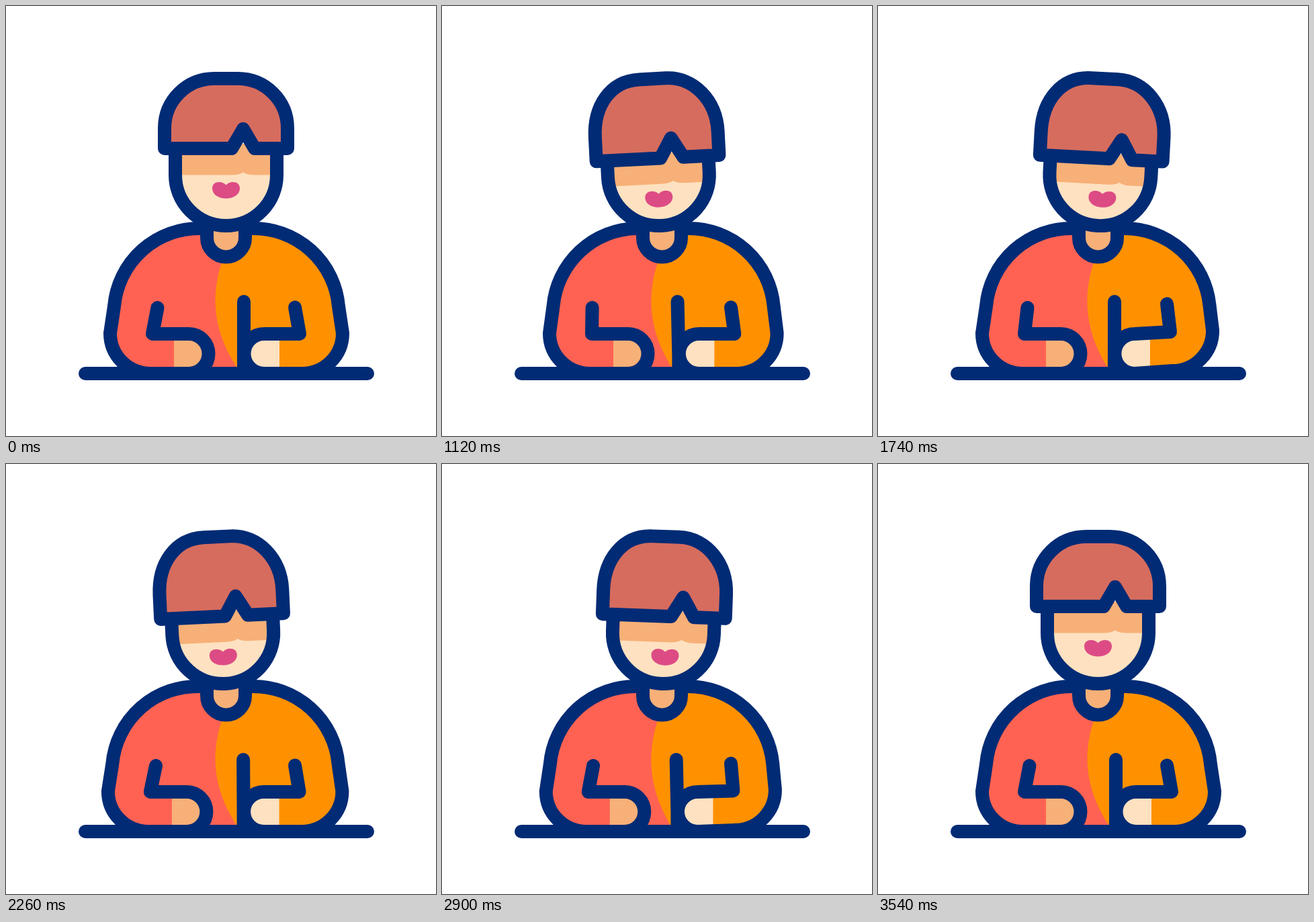
An HTML page with a canvas for the animation above (3.6 s loop, 640x640 px).

```html
<!DOCTYPE html>
<html lang="en">
<head>
<meta charset="utf-8">
<title>Person at a desk</title>
<style>
  html, body { margin: 0; width: 100%; height: 100%; overflow: hidden; background: #fff; }
  canvas { display: block; width: 640px; height: 640px; }
</style>
</head>
<body>
<canvas id="stage" width="640" height="640"></canvas>
<script>
const ctx = document.getElementById('stage').getContext('2d');
const LOOP = 3600, START = 120, CYCLE = 1080, END = START + 3 * CYCLE;
const INK = '#022b75', CORAL = '#ff6252', ORANGE = '#ff9100', HAIR = '#d66c5e',
      SKIN = '#fee1c0', SHADE = '#f7b077', LIPS = '#dd4b85';

const { PI, sin, max } = Math;

// Progress of t through [from, to], held at 0 and 1 outside.
const progress = (t, from, to) => Math.min(1, max(0, (t - from) / (to - from)));
const ease = u => u * u * (3 - 2 * u);
const swing = (u, warp = 1) => sin(2 * PI * u ** warp);

function headPose(t) {
  const drop = ease(progress(t, START, 400)) - ease(progress(t, 3320, 3540));
  return { drop, tilt: drop * (0.3 + 3.25 * swing((t - 300) / CYCLE)) };
}

function leftArmPose(t) {
  return {
    shift: (6.8 - 0.0016 * t) * swing(progress(t, 540, 2940)),
    sleeve: -3 * sin(PI * progress(t, 600, 3000))
  };
}

function rightArmPose(t) {
  const u = t < START || t >= END ? 0 : (t - START) % CYCLE / CYCLE;
  const side = 6.5 * swing(u, 0.8);
  return { side, hand: 0.7 * side, thumb: 8.5 * swing(u, 0.9), lift: 6 * max(0, sin(PI * u / 0.65)) };
}

function fill(d, color) {
  ctx.fillStyle = color;
  ctx.fill(new Path2D(d));
}

function line(d) {
  ctx.stroke(new Path2D(d));
}

function fillInside(clip, d, color) {
  ctx.save();
  ctx.clip(new Path2D(clip));
  fill(d, color);
  ctx.restore();
}

function drawBody(t) {
  const { shift, sleeve } = leftArmPose(t);
  const { side, hand, thumb, lift } = rightArmPose(t);

  const body = `M${215 + shift} 547 A60 60 0 0 1 ${155 + shift} 487 L${161 + shift * 0.9} 447
    A127 127 0 0 1 290 331 H366 A127 127 0 0 1 ${495 + side * 0.55} ${447 - lift * 0.6}
    L${501 + side} ${487 - lift} A60 60 0 0 1 ${441 + side} ${547 - lift} L${384 + hand} 547 Z`;
  fill(body, CORAL);
  fillInside(body, `M323 376 C306 424 304 478 ${345 + hand} 540 V560 H540 V320 H323 Z`, ORANGE);

  const leftX = 272 + shift, leftCuff = 250 + shift;
  const rightX = 384 + hand, rightCuff = 407 + hand, rise = lift * 0.45;
  const leftFist = `L${leftX} 488 a29.5 29.5 0 0 1 0 59`;
  const rightFist = `L${rightX} 488 a29.5 29.5 0 0 0 0 59`;
  fill(`M${leftCuff} 488 ${leftFist} H${leftCuff} Z`, SHADE);
  fill(`M${rightCuff} ${488 - rise} ${rightFist} L${rightCuff} ${547 - rise} Z`, SKIN);

  line(body);
  line(`M${225.5 + sleeve} 449 L${218 + shift} 488 ${leftFist}`);
  line(`M430 ${448.5 - lift * 1.3} L${437 + hand} ${488 - lift * 0.75} ${rightFist}`);
  line(`M${354 + thumb} 440 L${354 + hand} 520 V547`);

  const collar = 'M299 331 V345 a28.5 28.5 0 0 0 57 0 V331';
  fill(collar, SHADE);
  line(collar);
  line('M118 547 H538');
}

function drawHead(t) {
  const { drop, tilt } = headPose(t);
  ctx.save();
  ctx.translate(327.5 - drop, 332);
  ctx.rotate(tilt * PI / 180);
  ctx.translate(-327.5, -332);

  const brow = 205 + 14 * drop;
  const face = `M252 ${brow} V251.5 a75.5 75.5 0 0 0 151 0 V${brow}`;
  const notch = 353 + drop * (1.3 * tilt - 0.5);
  const shadeY = 251.5 + 13.5 * drop;
  fill(face, SKIN);
  fillInside(face, `M240 195 H415 V${shadeY} H${notch + 17} Q${notch + 6} ${shadeY} ${notch} ${shadeY - 4}
    Q${notch - 6} ${shadeY} ${notch - 17} ${shadeY} H240 Z`, SHADE);
  line(face);

  ctx.save();
  ctx.translate(drop * (1.7 + tilt), 13 * drop);
  fill(`M327.5 266.5 C333 260 348 260 348 271.5 C348 281 338 286.5 327.5 286.5
    C317 286.5 307 281 307 271.5 C307 260 322 260 327.5 266.5 Z`, LIPS);
  ctx.restore();

  // The crown stays put and stretches as the brim comes down.
  const brim = 212 + 14.5 * drop, temple = 182 + 9 * drop, bend = 141 + 4 * drop;
  const helmet = `M236 ${brim} V${temple} C236 ${bend} ${269 - 7 * drop} 108 ${310 - 4 * drop} 108
    H${345 + drop} C${386 + drop} 108 419 ${bend} 419 ${temple} V${brim}
    H${notch + 17} L${notch} ${brim - 29} L${notch - 17} ${brim} Z`;
  fill(helmet, HAIR);
  line(helmet);
  ctx.restore();
}

function frame(now) {
  const t = now % LOOP;
  ctx.fillStyle = '#fff';
  ctx.fillRect(0, 0, 640, 640);
  ctx.strokeStyle = INK;
  ctx.lineWidth = 20;
  ctx.lineCap = ctx.lineJoin = 'round';
  drawBody(t);
  drawHead(t);
  requestAnimationFrame(frame);
}

frame(0);
</script>
</body>
</html>
```
